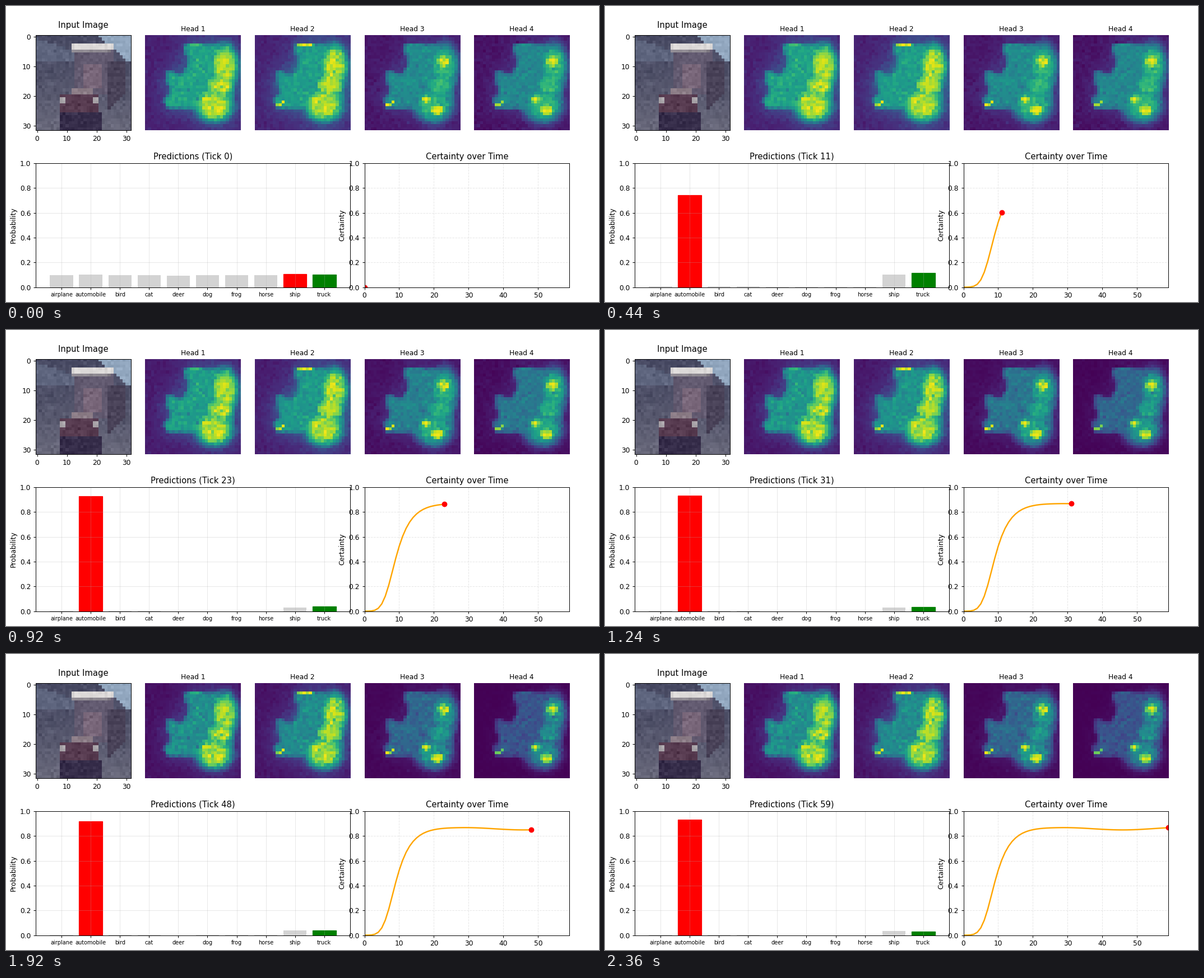
Write a matplotlib script that moves like this. It is 1058 px wide and 529 px high and loops after 2.4 s.

```python
import numpy as np
import matplotlib.pyplot as plt
from matplotlib.animation import FuncAnimation
from matplotlib.colors import to_rgb
from matplotlib.path import Path

W, H = 1058, 529
DPI = W / 12
TICKS = 60
N = 32
CLASSES = ["airplane", "automobile", "bird", "cat", "deer",
           "dog", "frog", "horse", "ship", "truck"]
AUTO, DEER, SHIP, TRUCK = 1, 4, 8, 9
X, Y = np.meshgrid(np.arange(N) + 0.5, np.arange(N) + 0.5)
time = np.arange(TICKS)


# --- predictions ----------------------------------------------------------
def predictions():
    """Softmax of class scores that rise, saturate and sag a little late on."""
    drive = 8.7 * (1 - np.exp(-(time / 11.75) ** 2.12))
    sag = np.where(time > 28, np.sin(np.pi * (time - 28) / 36) ** 2, 0)
    drive = drive - 0.48 * sag
    late = time / (TICKS - 1)

    pull = np.zeros((TICKS, len(CLASSES)))
    pull[:, :4] = 0.1
    pull[:, AUTO] = 1
    pull[:, SHIP] = 0.595 + 0.02 * late
    pull[:, TRUCK] = 0.635 - 0.03 * late

    score = drive[:, None] * pull
    score[:, [AUTO, SHIP, TRUCK]] += [0.03, 0.05, 0.04]
    score[:, DEER] -= 0.05
    p = np.exp(score)
    return p / p.sum(axis=1, keepdims=True)


probs = predictions()
entropy = -(probs * np.log(probs)).sum(axis=1)
certainty = np.clip(1 - entropy / np.log(len(CLASSES)), 0, 1)


# --- pictures -------------------------------------------------------------
def box(x0, x1, y0, y1):
    return (X > x0) & (X < x1) & (Y > y0) & (Y < y1)


def truck_image():
    """Blocky truck made of a few flat shapes."""
    top, ground = np.array(to_rgb("#484a63")), np.array(to_rgb("#6a6a7c"))
    img = top + (ground - top) * (Y[..., None] / N) ** 1.5
    shapes = [
        ((X < 14) & (Y > 1 + 0.35 * X) & (Y < 9), "#5d647d"),
        ((X > 20.5 + 1.1 * Y) & (Y < 9.5), "#91a6be"),
        (box(13, 26, 5, 20), "#625a70"),
        (box(16, 22, 10, 18), "#79677a"),
        (box(24, 30, 9, 26) & (X + Y < 50), "#494258"),
        (box(12, 26, 3, 5), "#dcd9d8"),
        (box(12, 25, 5, 6), "#8d8890"),
        (box(8, 21, 20, 26), "#573b50"),
        (box(12, 19, 18, 20), "#8b7c86"),
        (box(8, 22, 26, 32), "#362d4a"),
        (box(8, 10, 21, 23) | box(19, 21, 21, 23), "#a9a4a9"),
    ]
    for mask, color in shapes:
        img[mask] = to_rgb(color)
    grain = np.random.default_rng(4).normal(0, 0.022, (N, N, 1))
    return np.clip(img + grain, 0, 1)


def blur(a, passes):
    for _ in range(passes):
        p = np.pad(a, 1, mode="edge")
        a = (p[:-2, 1:-1] + p[2:, 1:-1] + p[1:-1, :-2] + p[1:-1, 2:] + 4 * a) / 8
    return a


def blob(cx, cy, rx, ry):
    r2 = ((X - cx) / rx) ** 2 + ((Y - cy) / ry) ** 2
    return 1 / (1 + r2 ** 2.6)


OUTLINE = Path([(13, 3), (27, 2.5), (31, 7), (31.3, 14), (29.8, 19), (30, 24),
                (27.5, 28.5), (23, 30), (19, 28), (16, 25), (7, 25), (6, 21.5),
                (8, 19.5), (6.5, 13), (8, 11.5), (12, 13.5), (14, 10)])
inside = OUTLINE.contains_points(np.c_[X.ravel(), Y.ravel()])
body = blur(inside.reshape(N, N).astype(float), 2)
halo = blur(body, 40)
lobes = np.maximum.reduce([blob(26.5, 10.5, 4.8, 7.5), blob(25, 17, 4.8, 4),
                           blob(23, 23.5, 6.6, 5.8)])
peaks = np.maximum.reduce([blob(26.3, 9, 2.6, 2.2), blob(24.3, 25.2, 2.8, 2.2),
                           blob(20.5, 21.7, 1.7, 1.5)])
glint = np.maximum(blob(8, 23.5, 1.1, 1), blob(9.5, 22.5, 0.8, 0.7))
roof = blob(16.8, 3.5, 3, 0.7)


def attention(seed, base, hot, floor, roof_level, glint_level):
    v = np.maximum.reduce([floor * (1 + 3 * halo), base * body, hot * lobes,
                           0.95 * peaks, roof_level * roof, glint_level * glint])
    rng = np.random.default_rng(seed)
    v = v * (1 + rng.normal(0, 0.06, (N, N))) + rng.normal(0, 0.014, (N, N))
    return np.clip(v, 0, 0.98)


heads = [attention(1, 0.58, 0.88, 0.09, 0.68, 0.60),
         attention(2, 0.56, 0.88, 0.10, 1.00, 0.95),
         attention(3, 0.48, 0.65, 0.06, 0.50, 0.95),
         attention(4, 0.46, 0.65, 0.05, 0.48, 0.85)]
sharpen = [0.30, 0.25, 0.50, 0.75]
u = np.clip((time - 11) / 37, 0, 1)
focus = u * u * (3 - 2 * u)

# --- figure ---------------------------------------------------------------
fig = plt.figure(figsize=(W / DPI, H / DPI), dpi=DPI, facecolor="white")
LEFT, CELL, GAP = 52.9, 170.04, 25.5


def panel(col, span, bottom, height):
    x = LEFT + col * (CELL + GAP)
    w = span * CELL + (span - 1) * GAP
    return fig.add_axes([x / W, bottom / H, w / W, height / H])


ax_in = panel(0, 1, H - 222.2, CELL)
ax_in.imshow(truck_image())
ax_in.set_title("Input Image", pad=10.5)

maps = []
for k, field in enumerate(heads):
    ax = panel(k + 1, 1, H - 222.2, CELL)
    maps.append(ax.imshow(field, cmap="viridis", vmin=0, vmax=1))
    ax.set_title(f"Head {k + 1}", fontsize=10)
    ax.axis("off")

ax_pred = panel(0, 3, 26.45, 221.4)
bars = ax_pred.bar(range(len(CLASSES)), probs[0], color="lightgray")
ax_pred.set_xlim(-0.89, 9.89)
ax_pred.set_ylim(0, 1)
ax_pred.set_xticks(range(len(CLASSES)), CLASSES, fontsize=8)
ax_pred.set_ylabel("Probability")
ax_pred.grid(alpha=0.3)
title = ax_pred.set_title("Predictions (Tick 0)")

ax_cert = panel(3, 2, 26.45, 221.4)
ax_cert.set_xlim(0, TICKS - 1)
ax_cert.set_ylim(0, 1)
ax_cert.set_title("Certainty over Time")
ax_cert.set_xlabel("Tick")
ax_cert.set_ylabel("Certainty")
ax_cert.grid(alpha=0.3, linestyle="--")
curve, = ax_cert.plot([], [], color="orange", linewidth=2)
dot, = ax_cert.plot([], [], "ro", markersize=7)


def update(i):
    for image, field, k in zip(maps, heads, sharpen):
        image.set_data(field ** (1 + k * focus[i]))
    best = probs[i].argmax()
    for j, bar in enumerate(bars):
        bar.set_height(probs[i, j])
        if j == best:
            bar.set_color("red")
        elif j == TRUCK:
            bar.set_color("green")
        else:
            bar.set_facecolor("lightgray")
            bar.set_edgecolor("none")
    title.set_text(f"Predictions (Tick {i})")
    curve.set_data(time[:i + 1], certainty[:i + 1])
    dot.set_data([i], [certainty[i]])
    return [*maps, *bars, title, curve, dot]


anim = FuncAnimation(fig, update, frames=TICKS, interval=40, repeat=True,
                     repeat_delay=0, blit=False)
plt.show()
```
